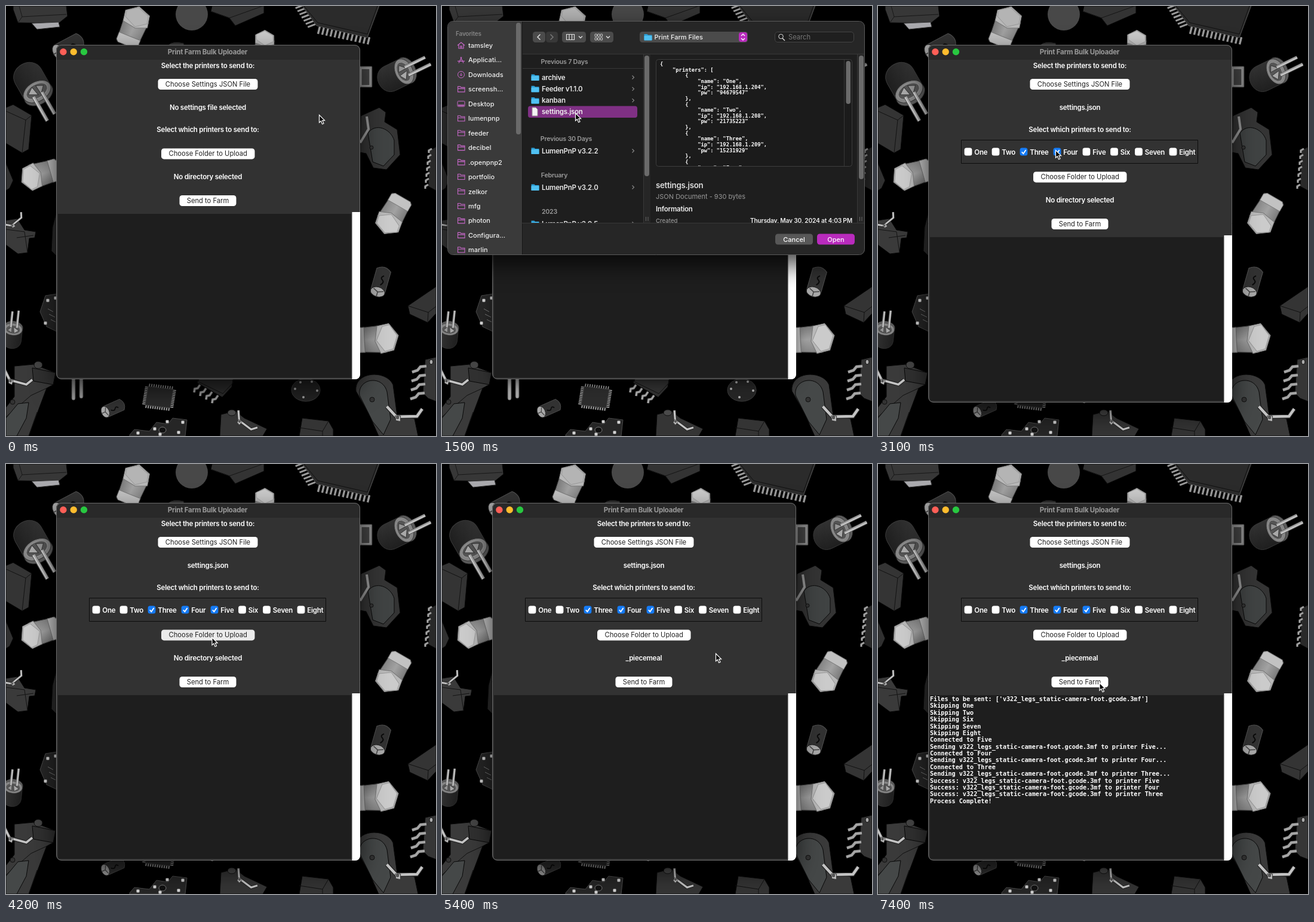
An HTML page with a canvas for the animation above (8.54 s loop, 720 by 720 pixels).

```html
<!DOCTYPE html>
<html lang="en">
<head>
<meta charset="utf-8">
<title>Print Farm Bulk Uploader</title>
<style>
html, body { margin: 0; width: 100%; height: 100%; overflow: hidden; background: #000; }
canvas { display: block; width: 100vw; height: 100vh; }
</style>
</head>
<body>
<canvas id="stage" width="720" height="720"></canvas>
<script>
const LOOP = 8540, STEP = 100, TAU = Math.PI * 2;
const SANS = 'Inter, "Open Sans", sans-serif';
const MONO = '"DejaVu Sans Mono", monospace';
const PINK = '#b92bbd', PURPLE = '#7f3084';
const screen = document.getElementById('stage').getContext('2d');
let c = screen;

// ---- drawing helpers ----
function shape(d, fill, line = '#080808', w = 1) {
  const p = new Path2D(d);
  if (fill) { c.fillStyle = fill; c.fill(p); }
  if (line) { c.strokeStyle = line; c.lineWidth = w; c.stroke(p); }
}
function box(x, y, w, h, r, fill, line) {
  c.beginPath();
  c.roundRect(x, y, w, h, r);
  if (fill) { c.fillStyle = fill; c.fill(); }
  if (line) { c.strokeStyle = line; c.lineWidth = 1; c.stroke(); }
}
function oval(x, y, rx, ry, fill, line) {
  c.beginPath();
  c.ellipse(x, y, rx, ry, 0, 0, TAU);
  if (fill) { c.fillStyle = fill; c.fill(); }
  if (line) { c.strokeStyle = line; c.lineWidth = 1; c.stroke(); }
}
// y is the middle of the capital letters; semibold text is set larger and tighter
function text(s, x, y, color = '#fff', size = 11, weight = 600, align = 'left', font = SANS) {
  const tight = font === SANS && weight >= 600;
  if (tight) size *= 1.045;
  c.font = `${weight} ${size}px ${font}`;
  c.letterSpacing = tight ? `${-size * 0.02}px` : '0px';
  c.textAlign = align;
  c.fillStyle = color;
  c.fillText(s, x, y + size * 0.365);
}
function at(x, y, deg, scale, draw) {
  c.save();
  c.translate(x, y);
  c.rotate(deg * Math.PI / 180);
  c.scale(scale, scale);
  draw();
  c.restore();
}
function clipped(x, y, w, h, draw) {
  c.save();
  c.beginPath();
  c.rect(x, y, w, h);
  c.clip();
  draw();
  c.restore();
}

// ---- wallpaper parts ----
function capacitor(x, y, deg, s = 1, face = '#cbcbcb') {
  at(x, y, deg, s, () => {
    const g = c.createLinearGradient(0, -20, 0, 20);
    g.addColorStop(0, '#7b7b7b');
    g.addColorStop(0.5, '#a2a2a2');
    g.addColorStop(1, '#868686');
    shape('M-32-18L14-21V21L-32 18Z', g, '#444');
    shape('M-34-15L-30-19L-18-19V19L-30 19L-34 14Z', '#c2c2c2', '#777');
    shape('M2-20L20-23L34-4L26 18L6 22L-2 3Z', '#b9b9b9', '#777');
    shape('M10-19L21-21L32-4L25 16L12 19L0 2Z', face, '#9a9a9a');
  });
}
function led(x, y, deg, s = 1) {
  at(x, y, deg, s, () => {
    const g = c.createLinearGradient(-25, 0, 25, 0);
    g.addColorStop(0, '#1f1f1f');
    g.addColorStop(1, '#323232');
    shape('M-26 0V-33C-25-64 25-64 26-33V0Z', g, '#3a3a3a');
    oval(0, 3, 27, 18, '#5c5c5c', '#222');
    oval(0, -2, 26, 17, '#858585', '#333');
    oval(0, -3, 20, 12, '#555', '#9a9a9a');
    shape('M-16-5L-4-13L-1 4Z', '#a8a8a8', '#333');
    shape('M3-12L15-6L4 5Z', '#959595', '#333');
    shape('M-10 3V51M7 3V47', null, '#555', 7);
    shape('M-10 3V51M7 3V47', null, '#a5a5a5', 5);
    shape('M-11 3V51M6 3V47', null, '#d8d8d8', 1.5);
  });
}
function battery(x, y, deg, s = 1) {
  at(x, y, deg, s, () => {
    shape('M-12-20Q0-30 12-20V16Q0 28-12 16Z', '#323232', '#505050');
    oval(0, 17, 12, 8, '#a9a9a9', '#222');
    shape('M-8 13L0 17L9 14M0 17V25', null, '#444', 1.5);
    shape('M3-11Q-3-7 2-4T1 5', null, '#0a0a0a', 2);
  });
}
function pinRow(x1, y1, x2, y2, n, dx, dy, w) {
  let d = '';
  for (let i = 0; i < n; i++) {
    const f = (i + 0.5) / n;
    d += `M${x1 + (x2 - x1) * f} ${y1 + (y2 - y1) * f}l${dx} ${dy}`;
  }
  shape(d, null, '#999', w);
}
function quadChip(x, y, ux, uy, vx, vy, n) {
  const k = 5 / Math.hypot(ux, uy), m = 5 / Math.hypot(vx, vy);
  pinRow(x, y, x + ux, y + uy, n, -vx * m, -vy * m, 1.8);
  pinRow(x + vx, y + vy, x + vx + ux, y + vy + uy, n, vx * m, vy * m, 2.2);
  pinRow(x, y, x + vx, y + vy, n, -ux * k, -uy * k, 1.8);
  pinRow(x + ux, y + uy, x + ux + vx, y + uy + vy, n, ux * k, uy * k, 1.8);
  shape(`M${x} ${y}l${ux} ${uy}l${vx} ${vy}l${-ux} ${-uy}Z`, '#2b2b2b', '#484848');
}
function legs(x, y, dx, dy, n, path, w = 4) {
  for (let i = 0; i < n; i++) {
    const d = `M${x + dx * i} ${y + dy * i}${path}`;
    shape(d, null, '#444', w + 1.5);
    shape(d, null, '#a6a6a6', w);
  }
}
function lever(x, y, deg, s = 1) {
  at(x, y, deg, s, () => {
    shape('M-30-24L-16-2L22 4L34-8', null, '#222', 8);
    shape('M-30-24L-16-2L22 4L34-8', null, '#c4c4c4', 5);
    shape('M-18-4L-8-2L-10 8L-18 5Z', '#bdbdbd', '#333');
    oval(-14, 0, 3, 3, '#555');
  });
}
function board(points, dots) {
  shape(points, '#262626', '#484848');
  for (const [x, y] of dots) box(x - 2.5, y - 2.5, 5, 5, 1, '#d2d2d2');
}

function wallpaper() {
  c.fillStyle = '#000';
  c.fillRect(0, 0, 720, 720);
  // top edge
  shape('M12 0H101L103 17L88 29L20 28L12 6Z', '#373737');
  shape('M20 28L27 18L101 14M27 18L22 0', null, '#181818');
  shape('M43 29L88 27L90 35L52 39Z', '#a9a9ad', '#333');
  capacitor(214, 34, -68, 1, '#b4b4b4');
  oval(311, 14, 27, 27, '#484848');
  shape('M345 0H432V12L384 33L374 20L343 9Z', '#333');
  shape('M343 9L374 20L430 0M374 20L384 33', null, '#151515');
  pinRow(496, -4, 520, 33, 7, -13, 5, 3);
  pinRow(522, 34, 612, 53, 13, -3, 12, 3.4);
  shape('M492-6L520 33L605 53L627-6Z', '#2b2b2b', '#505050');
  shape('M494-6L522 28L605 47L624-6', null, '#111');
  shape('M272 65Q278 58 298 62V66H272Z', '#333');
  capacitor(432, 66, -80, 0.75);
  battery(104, 68, 62, 1.1);
  // left side
  led(53, 145, -30, 0.96);
  shape('M0 170L12 165L43 183L38 240L27 246L0 230Z', '#343434');
  shape('M0 176L33 191L27 246M33 191L43 183', null, '#121212');
  shape('M0 263L12 292L6 305L0 309Z', '#303030');
  capacitor(57, 282, 164, 0.98);
  shape('M0 359L19 356L31 375L50 378L48 388L39 389L36 413L20 415L0 400Z', '#3a3a3a');
  shape('M0 374L31 378L36 413M18 388L46 384', null, '#141414');
  lever(16, 362, -48, 0.55);
  shape('M84 347L78 370L76 410L84 418Z', '#2c2c2c');
  led(12, 540, -174, 0.6);
  board('M57 512L66 485L85 482V545L68 537Z', [[70, 493], [66, 531], [83, 489]]);
  shape('M70 507l9 5m-7 4l10 5m-7 4l8 4', null, '#777');
  shape('M14 603L46 600L83 614L79 634L68 640L38 720H0V672L14 654Z', '#3a3a3a');
  shape('M44 606L83 614L79 634L46 628Z', '#303030');
  shape('M0 688L42 652L68 640M38 720L52 680', null, '#111');
  shape('M0 690L20 666L38 664L34 690L18 720H0Z', '#454848');
  oval(54, 601, 7, 6, '#444', '#111');
  oval(11, 663, 4, 4, '#333', '#111');
  lever(18, 629, 6, 0.75);
  // bottom edge
  for (const x of [113, 126]) box(x - 3, 618, 6, x > 120 ? 39 : 42, 3, '#a6a6a6', '#444');
  battery(179, 674, 66, 0.82);
  quadChip(238, 637, 42, 5, -5, 31, 11);
  legs(325, 634, 10, 6, 4, 'l-4 6l-5 1l-1 6', 3);
  shape('M328 615H382L378 638L362 655L320 631Z', '#303030');
  shape('M320 628L363 649L381 630', null, '#111');
  board('M207 718L215 709L240 712L252 697L271 700L279 690L303 693L300 720H207Z',
    [[221, 715], [249, 708], [270, 696], [296, 697], [289, 714], [258, 717]]);
  oval(262, 710, 6, 5, '#111', '#777');
  shape('M360 684L384 678L399 690L437 708L430 720H358Z', '#353535');
  oval(378, 681, 7, 5, '#4a4a4a', '#111');
  lever(399, 700, 28, 0.65);
  oval(502, 643, 24, 19, '#252525', '#3b3b3b');
  for (const [x, y] of [[484, 641], [493, 630], [512, 629], [521, 644], [498, 655]]) oval(x, y, 2, 2, '#aaa');
  shape('M496 690L540 695L548 709V720H491Z', '#343434');
  shape('M491 706L530 712L540 695M530 712V720', null, '#111');
  shape('M586 645C582 612 636 608 648 634L655 686L684 691L690 720H624L607 682Z', '#3a3a3a');
  shape('M592 652C588 624 630 616 638 646L644 692L632 718L614 696Z', '#454848');
  oval(613, 659, 4, 4, '#333', '#111');
  lever(668, 687, -10, 0.9);
  // right side
  box(590, 101, 23, 35, 1, '#8b8b8b', '#333');
  box(595, 105, 14, 28, 0, '#444', '#aaa');
  led(668, 109, -116, 0.86);
  shape('M594 184L625 170L636 178L634 194L655 207L660 249L637 274L615 271L603 247L593 245Z', '#343434');
  shape('M606 213C618 195 644 205 650 225L650 249L632 268L614 261Z', '#404343');
  shape('M593 229L607 206L604 185', null, '#999', 4);
  oval(612, 237, 3, 3, '#333', '#111');
  shape('M720 236L709 242L707 302L720 309Z', '#292929');
  legs(713, 239, -1, 10, 7, 'l-5 3l0 4', 2.5);
  capacitor(647, 350, 120);
  battery(627, 462, 16, 1.02);
  shape('M673 502L720 470V515L706 530L676 516Z', '#343434');
  shape('M673 502L707 513L720 503M707 513L706 530', null, '#111');
  capacitor(620, 558, -3, 1.1);
  shape('M702 592L720 588V662L707 657L698 648Z', '#363636');
  oval(712, 596, 3, 4, '#aaa', '#111');
  legs(704, 603, -1, 15, 4, 'l-10 1l-5 6l-9 3');
}

const backdrop = document.createElement('canvas');
backdrop.width = backdrop.height = 720;
c = backdrop.getContext('2d');
wallpaper();
c = screen;

// ---- main window ----
const PRINTERS = ['One', 'Two', 'Three', 'Four', 'Five', 'Six', 'Seven', 'Eight'];
const CHECK_X = [151, 197, 244, 300, 349, 395.5, 436.5, 494];
const CHECKED_FROM = { Three: 2700, Four: 3100, Five: 3600 };
const FILE = 'v322_legs_static-camera-foot.gcode.3mf';
const sending = p => [`Connected to ${p}`, `Sending ${FILE} to printer ${p}...`];
const success = p => `Success: ${FILE} to printer ${p}`;
const LOG = [
  [6200, [`Files to be sent: ['${FILE}']`,
    ...['One', 'Two', 'Six', 'Seven', 'Eight'].map(p => `Skipping ${p}`)]],
  [6300, ['Five', 'Four', 'Three'].flatMap(sending)],
  [7100, [success('Five')]],
  [7200, [success('Four')]],
  [7400, [success('Three'), 'Process Complete!']]
];

function shadow(strength, blur, dy) {
  c.shadowColor = `rgba(0,0,0,${strength})`;
  c.shadowBlur = blur;
  c.shadowOffsetY = dy;
}
function pushButton(label, x, w, y, active, pressed) {
  box(x, y - 9, w, 18, 4.5, !active ? '#8e8e8e' : pressed ? '#ebebeb' : '#fff');
  text(label, x + w / 2, y - 0.3, '#222', 11.2, 400, 'center');
}
function checkbox(name, x, q) {
  const on = q >= CHECKED_FROM[name];
  box(x - 6.4, 237.6, 12.8, 12.8, 3.5, on ? '#157bf6' : '#fff');
  if (on) shape(`M${x - 3.2} 244.3l2.6 3l4.2 -6.4`, null, '#fff', 1.8);
  text(name, x + 10.3, 245);
}
function mainWindow(q, active) {
  const tall = q >= 1600, dy = tall ? 39 : 0, bottom = 625 + dy, logTop = 348 + dy;
  c.save();
  active ? shadow(0.7, 40, 16) : shadow(0.5, 20, 6);
  box(84, 65, 509, bottom - 65, 9, '#323232');
  c.restore();
  c.save();
  c.beginPath();
  c.roundRect(84, 65, 509, bottom - 65, 9);
  c.clip();
  c.fillStyle = active ? '#292929' : '#171717';
  c.fillRect(84, 65, 509, 25);
  c.fillStyle = '#1e1e1e';
  c.fillRect(87, logTop, 491, bottom - 3 - logTop);
  c.restore();
  box(84.5, 65.5, 508, bottom - 66, 8.5, null, 'rgba(140,140,140,.65)');
  box(579.5, logTop - 3, 13.5, bottom - logTop + 3, [0, 0, 8, 0], '#fff');

  ['#fe5f57', '#febc2e', '#28c840'].forEach((col, i) =>
    oval(95.9 + i * 17.3, 76.8, 5.7, 5.7, active ? col : '#3d3d3d'));
  const mid = (s, y) => text(s, 338, y, '#fff', 11, 600, 'center');
  text('Print Farm Bulk Uploader', 337.5, 77, active ? '#999' : '#595959', 11, 700, 'center');
  mid('Select the printers to send to:', 100);
  pushButton('Choose Settings JSON File', 254.5, 167, 131, active, q >= 400 && q < 800);
  mid(tall ? 'settings.json' : 'No settings file selected', 170);
  mid('Select which printers to send to:', 207);
  if (tall) {
    box(139.5, 224.5, 396, 39, 0, null, '#0c0c0c');
    PRINTERS.forEach((p, i) => checkbox(p, CHECK_X[i], q));
  }
  pushButton('Choose Folder to Upload', 260, 156.5, 247.4 + dy, active, q >= 4200 && q < 4400);
  mid(q >= 5200 ? '_piecemeal' : 'No directory selected', 286.3 + dy);
  pushButton('Send to Farm', 290.5, 95, 326 + dy, active, false);
  LOG.filter(([t]) => q >= t).flatMap(([, lines]) => lines).forEach((s, i) =>
    text(s, 87, 393.4 + i * 11.37, '#fff', 10.15, 700, 'left', MONO));
}

// ---- file dialog ----
const PLACES = ['tamsley', 'Applicati...', 'Downloads', 'screensh...', 'Desktop', 'lumenpnp', 'feeder',
  'decibel', '.openpnp2', 'portfolio', 'zelkor', 'mfg', 'photon', 'Configura...', 'marlin', 'docs',
  'ohai', 'video', 'Print Far...', 'videoSpe...', 'lumen-de...'];
const JSON_LINES = ['{', '    "printers": ['];
[['One', 204, '94679547'], ['Two', 208, '21735223'], ['Three', 209, '15231929'], ['Four', 210, '46120853']]
  .forEach(([name, ip, pw]) => JSON_LINES.push('        {', `            "name": "${name}",`,
    `            "ip": "192.168.1.${ip}",`, `            "pw": "${pw}"`, '        },'));

function placeIcon(i, y) {
  const pink = '#c667c8';
  if (i === 0) shape(`M26 ${y}l6 -5l6 5M28 ${y - 1}v6h8v-6M31 ${y + 5}v-4h2v4`, null, pink, 1.2);
  else if (i === 1) shape(`M28 ${y + 5}l5 -10M31 ${y - 5}l5 10M26 ${y + 2}h12`, null, pink, 1.2);
  else if (i === 2) {
    oval(32, y, 5.5, 5.5, null, pink);
    shape(`M32 ${y - 3}v5m-2 -2l2 2l2 -2`, null, pink);
  } else if (i === 4) {
    box(26, y - 4.5, 12, 9, 1.5, null, pink);
    shape(`M27 ${y + 2.5}h10`, null, pink, 2);
  } else shape(`M26.5 ${y - 4.5}h4l1.5 1.5h6v7.5h-11.5ZM26.5 ${y - 1}h11.5`, null, pink, 1.1);
}
function folder(x, y) {
  shape(`M${x} ${y - 5}h5l1.5 1.5h6.5v9h-13Z`, '#2c9fd6', null);
  box(x, y - 2.3, 13, 7.8, 1, '#50c1f2');
}
const chevron = (x, y, col = '#888') => shape(`M${x - 1.5} ${y - 3}l3 3l-3 3`, null, col, 1.2);
const thumb = (x, y, w, h) => box(x, y, w, h, 4, '#6a6a6a');
const heading = (s, x, y) => text(s, x, y, '#9a9a9a', 10.2, 600, 'center');
const rule = (x, y, w, h) => { c.fillStyle = '#383838'; c.fillRect(x, y, w, h); };
function row(name, x, y, end) {
  folder(x, y);
  text(name, x + 17.5, y, '#e8e8e8');
  chevron(end, y);
}
function track(x, bottom) {
  c.fillStyle = '#262626';
  c.fillRect(x, 81, 12, bottom - 81);
  rule(x, 81, 1, bottom - 81);
  shape(`M${x + 4.5} ${bottom - 10}v7m3.5 -7v7`, null, '#666');
}
function dialogButton(label, x, w, fill) {
  box(x, 381.5, w, 18, 4.5, fill);
  text(label, x + w / 2, 390.5, '#fff', 11, 500, 'center');
}
function sidebar(scroll, mark) {
  clipped(10, 26, 124, 391, () => {
    c.fillStyle = '#3a3a3a';
    c.fillRect(10, 26, 124, 391);
    text('Favorites', 23, 46.5 - scroll, '#858585', 9.6, 600);
    PLACES.forEach((name, i) => {
      const y = 66 + i * 24.45 - scroll;
      if (i === mark) box(18, y - 12.5, 94, 25, 5, '#525252');
      placeIcon(i, y);
      text(name, 44, y, '#f0f0f0', 11, 500);
    });
    thumb(124, scroll ? 113 : 28, 8, scroll ? 215 : 187);
  });
  c.fillStyle = '#151515';
  c.fillRect(134, 26, 1, 391);
}
function toolbar(title) {
  for (const [x, w] of [[152, 21], [201, 40], [248, 39], [331, 181]]) box(x, 43, w, 18, 4.5, '#4b4b4b');
  box(174, 43, 20, 18, 4.5, '#383838');
  shape('M164.5 47.5l-4.5 4.5l4.5 4.5', null, '#ddd', 1.5);
  shape('M181.5 47.5l4.5 4.5l-4.5 4.5', null, '#777', 1.5);
  shape('M208.5 47.5h13v9h-13ZM213 47.5v9m4.5 -9v9', null, '#ddd', 1.2);
  for (let i = 0; i < 6; i++) box(256 + i % 3 * 4.6, i < 3 ? 47 : 53, 3.4, 4, 0.5, null, '#ccc');
  for (const x of [232, 278]) shape(`M${x - 3} 50.5l3 3l3 -3`, null, '#ddd', 1.4);
  folder(338.5, 52);
  text(title, 355.5, 52, '#f0f0f0', 11, 500);
  box(497, 44, 14, 16, 4, PINK);
  shape('M501 50l3 -3l3 3M501 54l3 3l3 -3', null, '#fff', 1.4);
  box(557.5, 43.5, 132, 17, 4.5, '#1f1f1f', '#444');
  oval(567.5, 51, 3.8, 3.8, null, '#ddd');
  shape('M570 54l4 4', null, '#ddd', 1.5);
  text('Search', 580, 52.3, '#777', 11.2, 400);
}
function dialogFrame(draw) {
  c.save();
  shadow(0.75, 40, 16);
  box(10, 26, 698, 390, 9, '#262626');
  c.restore();
  c.save();
  c.beginPath();
  c.roundRect(10, 26, 698, 390, 9);
  c.clip();
  c.fillStyle = '#1e1e1e';
  c.fillRect(134, 80, 574, 284);
  rule(134, 80, 574, 1);
  draw();
  rule(134, 363, 574, 1);
  c.restore();
  box(9.5, 25.5, 698, 391, 9, null, '#5a5a5a');
}
function preview() {
  box(358.5, 89.5, 328, 179, 4, '#1b1b1b', '#3d3d3d');
  clipped(359, 90, 314, 178, () => JSON_LINES.forEach((s, i) =>
    text(s, 365, 97 + i * 9.63, '#fff', 8.75, 700, 'left', MONO)));
  rule(673, 90, 1, 178);
  thumb(676.5, 92, 7.5, 72);
  text('settings.json', 358, 300.5, '#ddd', 12.7);
  text('JSON Document - 930 bytes', 358, 319, '#999', 11, 400);
  text('Information', 358, 340, '#eee');
  text('Created', 358, 359.5, '#999', 9.6, 500);
  text('Thursday, May 30, 2024 at 4:03 PM', 687, 359.5, '#eee', 9.8, 600, 'right');
  thumb(698, 83, 8, 207);
}
function fileDialog(q) {
  const chosen = q >= 1300;
  dialogFrame(() => {
    sidebar(0, -1);
    toolbar('Print Farm Files');
    clipped(135, 81, 573, 282, () => {
      heading('Previous 7 Days', 205, 93);
      rule(135, 104, 202, 1);
      ['archive', 'Feeder v1.1.0', 'kanban'].forEach((s, i) => row(s, 149.5, 119.5 + i * 19.3, 320));
      if (chosen) box(144, 167.5, 183, 19.5, 4, PURPLE);
      shape('M151 170h6l3 3v11h-9Z', '#f4f4f4', '#999');
      text('settings.json', 167, 177.3, '#f0f0f0');
      heading('Previous 30 Days', 208, 222);
      row('LumenPnP v3.2.2', 149.5, 242.5, 320);
      heading('February', 188, 283.5);
      row('LumenPnP v3.2.0', 149.5, 303.5, 320);
      heading('2023', 180, 344.5);
      row('LumenPnP v3.0.5', 149.5, 364.5, 320);
      track(337, 363);
      thumb(339, 83, 8, 202);
      track(695, 363);
      if (chosen) preview();
    });
    dialogButton('Cancel', 558, 63, '#585858');
    dialogButton('Open', 628, 63, PINK);
  });
}
function folderDialog(q) {
  const chosen = q >= 4700, dim = '#606060';
  dialogFrame(() => {
    sidebar(154.5, 18);
    toolbar(chosen ? '_piecemeal' : 'LumenPnP v3.2.2');
    clipped(135, 81, 573, 270, () => {
      heading('Today', 131, 93);
      rule(135, 104, 132, 1);
      text('legs.3mf', 132, 119.5, dim);
      heading('Previous 7 Days', 136, 160);
      box(120, 171, 138, 19.5, 4, PURPLE);
      chevron(251, 180.8, '#ddd');
      ['gantry', 'gold', 'misc', 'petg', 'plate', 'strip', 'white'].forEach((s, i) =>
        text(s + '.3mf', 132, 200 + i * 19.2, dim));
      track(267, 350);
      thumb(270, 83, 8, 219);

      heading('Previous 7 Days', 350, 93);
      rule(280, 104, 201, 1);
      if (chosen) box(289, 109.7, 183, 19.5, 4, PURPLE);
      ['_piecemeal', 'gantry', 'gold', 'legs', 'misc', 'petg', 'plate', 'strip', 'white'].forEach((s, i) =>
        row(s, 294.5, 119.5 + i * 19.25, 465));
      track(481, 350);
      track(695, 350);
      if (chosen) {
        heading('Today', 540.5, 93);
        rule(494, 104, 201, 1);
        shape('M510 113h7l3 3v10h-10Z', '#7b7b6b', '#555');
        oval(515, 120, 2.5, 2.5, '#444');
        text('v322_legs_s...t.gcode.3mf', 526.5, 119.5, dim, 11, 500);
      }
    });
    rule(135, 350, 573, 1);
    thumb(327, 353.5, 378, 7.5);
    dialogButton('New Folder', 152, 78, '#4d4d4d');
    dialogButton('Cancel', 553, 65, '#585858');
    dialogButton('Choose', 625, 66, PINK);
  });
}

// ---- pointer: time, x, y ----
const PATH = [[0, 524, 182], [400, 386, 131], [800, 386, 131], [1300, 223, 179], [1500, 223, 179],
  [1600, 676, 391], [1700, 676, 391], [2300, 249, 240], [2600, 244, 241], [2800, 244, 241], [3000, 297, 241],
  [3200, 297, 241], [3500, 342, 241], [3600, 342, 241], [4000, 344.5, 290], [4400, 344.5, 290],
  [4700, 345, 118], [4900, 561, 118], [5100, 652, 389], [5200, 590, 362], [5400, 458, 317],
  [5900, 370.5, 366], [LOOP, 370.5, 366]];
function pointer(q) {
  const i = PATH.findIndex(p => p[0] > q);
  const [t0, x0, y0] = PATH[i - 1], [t1, x1, y1] = PATH[i];
  const f = (q - t0) / (t1 - t0), e = f * f * (3 - 2 * f);
  at(x0 + (x1 - x0) * e, y0 + (y1 - y0) * e, 0, 1, () =>
    shape('M.5 .5V13.2L3.4 10.6L5.6 15.8L8 14.8L5.8 9.7H9.6Z', '#050505', '#fff', 1.2));
}

function render(t) {
  const q = Math.floor(t / STEP) * STEP;
  const within = (a, b) => q >= a && q < b;
  c.drawImage(backdrop, 0, 0);
  mainWindow(q, !within(800, 2500) && !within(4400, 5300));
  if (within(800, 1600)) fileDialog(q);
  if (within(4400, 5200)) folderDialog(q);
  pointer(q);
}
const start = performance.now();
function tick() {
  render((performance.now() - start) % LOOP);
  requestAnimationFrame(tick);
}
tick();
</script>
</body>
</html>
```
